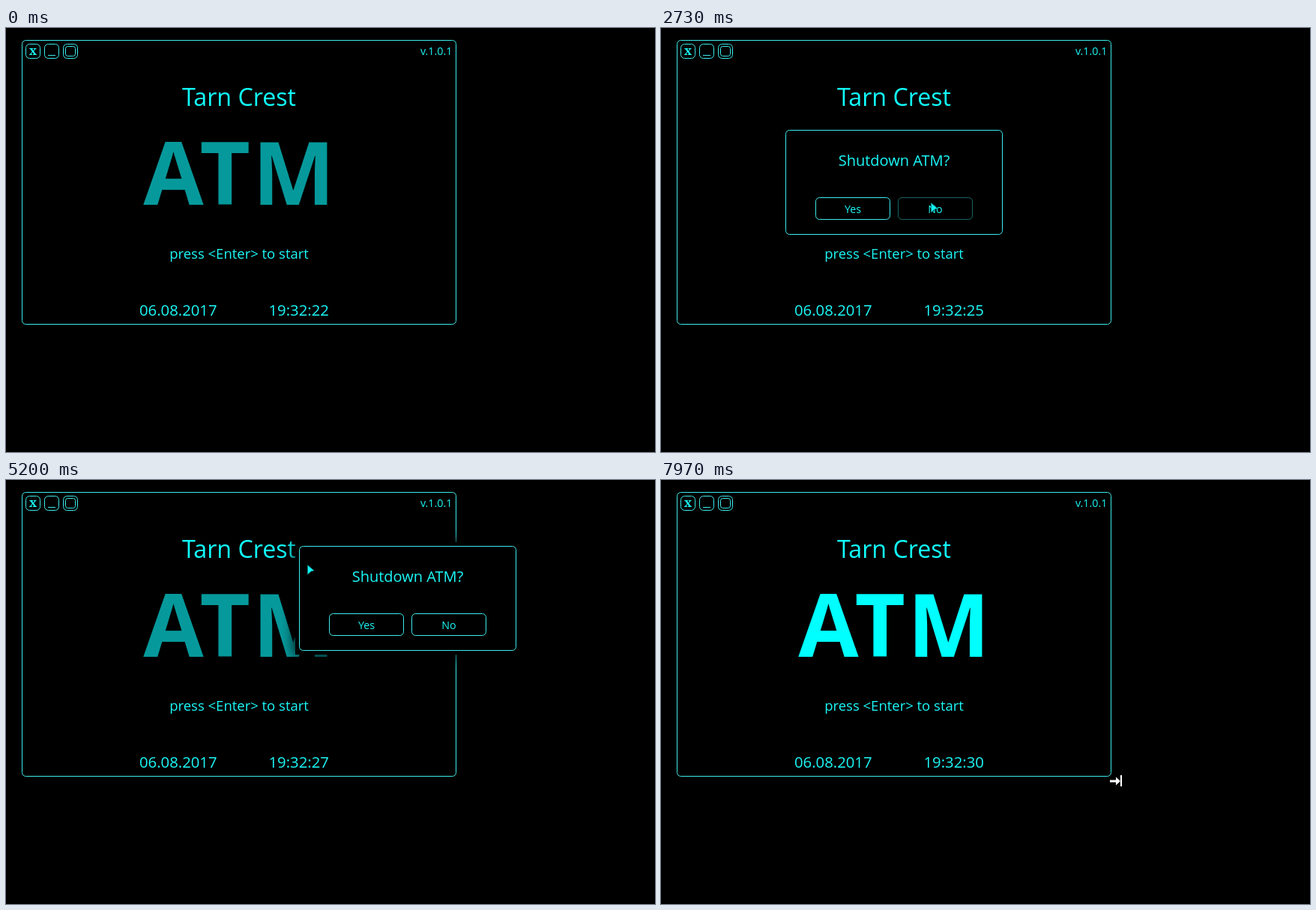
Write an HTML page that moves like this. It is 866 by 566 pixels and loops after 8000 ms.

```html
<!DOCTYPE html>
<html lang="en">
<head>
<meta charset="utf-8">
<title>ATM</title>
<style>
  html, body { margin: 0; width: 100%; height: 100%; overflow: hidden; background: #000; }
  svg { display: block; width: 866px; height: 566px; }
  text { fill: #1cf8f8; font-family: "Open Sans", "Noto Sans", sans-serif; font-weight: 500; }
  .line { fill: none; stroke: #3cecec; stroke-width: 1; }
  .mid { text-anchor: middle; }
  .heading { font-size: 32.2px; fill: #12ffff; }
  .logo { font-size: 116.5px; font-weight: 700; letter-spacing: 3px; }
  .prompt { font-size: 18.5px; }
  .clock { font-size: 20.3px; }
  .small { font-size: 14.3px; }
  .close { font: 700 16px "Noto Serif", serif; }
  .white { fill: #fff; }
</style>
</head>
<body>
<svg viewBox="0 0 866 566">
  <defs>
    <filter id="soft" x="-30%" y="-50%" width="160%" height="200%">
      <feGaussianBlur stdDeviation="9"/>
    </filter>
  </defs>

  <rect class="line" x="21.5" y="16.5" width="579" height="379" rx="5"/>
  <g class="line">
    <rect x="26.5" y="21.5" width="19" height="19" rx="5"/>
    <rect x="51.5" y="21.5" width="19" height="19" rx="5"/>
    <rect x="76.5" y="21.5" width="19" height="19" rx="5"/>
    <path d="M56 36.5h10"/>
    <rect x="79.5" y="24.5" width="13" height="13" rx="3"/>
  </g>
  <text class="close mid" x="36" y="36">x</text>
  <text class="small" x="595.5" y="36" text-anchor="end">v.1.0.1</text>

  <text class="heading mid" x="311" y="104">Tarn Crest</text>
  <text class="logo mid" id="logo" x="312.5" y="236">ATM</text>
  <text class="prompt mid" x="311" y="308">press &lt;Enter&gt; to start</text>
  <text class="clock" x="178" y="384">06.08.2017</text>
  <text class="clock" id="clock" x="350.5" y="384"></text>

  <g id="dialog">
    <rect x="-6" y="-6" width="302" height="152" filter="url(#soft)"/>
    <rect x="-5" y="-5" width="300" height="150"/>
    <rect class="line" x=".5" y=".5" width="289" height="139" rx="5"/>
    <text class="mid" x="145" y="48" font-size="20">Shutdown ATM?</text>
    <rect class="line" id="yes" x="40.5" y="90.5" width="99" height="29" rx="5"/>
    <rect class="line" id="no" x="150.5" y="90.5" width="99" height="29" rx="5"/>
    <text class="small mid" x="90" y="111">Yes</text>
    <text class="small mid" x="200" y="111">No</text>
  </g>

  <g id="cursor">
    <path id="arrow" d="M.5 .5L9 8L5 9L.5 13Z" fill="#14f5f5" stroke="#0a7a7a" stroke-width=".8"/>
    <g id="hand" class="white">
      <path d="M-7 0q2-2 3 0v-4q1-2 3-1q1-2 3 0q2-1 3 1q2 0 2 2v5l-2 4h-8z"/>
      <path d="M-2 -1v2M1 -1v2M4 -1v2" stroke="#000" stroke-width=".8"/>
    </g>
    <path id="resize" class="white" d="M-8 -1.5h8v-4l6 5.5l-6 5.5v-4h-8zM6 -8h2v15h-2z"/>
  </g>
</svg>
<script>
const LOOP = 8000;
const OPEN = [1900, 6820];
const DRAG = [2900, 3900];

// Places the pointer visits
const corner = [34, 20];
const grip = [379, 212];
const release = [604, 164];
const noButton = [554, 192];
const edge = [607, 402];

const stops = [
  [60, [760, 385]], [480, corner], [830, [515, 210]], [1630, [508, 254]],
  [2730, [360, 233]], [DRAG[0], grip], [DRAG[1], release], [4230, [129, 232]],
  [4600, corner], [5000, release], [5500, corner], [5850, corner],
  [6200, noButton], [OPEN[1], release], [7100, [674, 64]], [7700, edge]
];

const el = id => document.getElementById(id);
const clamp = v => Math.min(1, Math.max(0, v));
const mix = (a, b, k) => a + (b - a) * k;
const within = (t, [from, to]) => t >= from && t < to;
const show = (id, on) => el(id).setAttribute("visibility", on ? "inherit" : "hidden");
const move = (id, [x, y]) => el(id).setAttribute("transform", `translate(${Math.round(x)} ${Math.round(y)})`);

function pointerAt(t) {
  const i = stops.findIndex(([time]) => time > t);
  if (i < 1) return i ? edge : stops[0][1];
  const [t0, a] = stops[i - 1], [t1, b] = stops[i];
  const p = (t - t0) / (t1 - t0), k = p * p * (3 - 2 * p);
  return a.map((v, axis) => mix(v, b[axis], k));
}

// The drag slows down towards its end, sooner sideways than upwards
function dragOffset(t) {
  const left = 1 - clamp((t - DRAG[0]) / (DRAG[1] - DRAG[0]));
  return [
    (release[0] - grip[0]) * (1 - left ** 2.9),
    (release[1] - grip[1]) * (1 - left ** 1.8)
  ];
}

// A hovered button dims quickly and recovers slowly
const dimming = (t, on, off) => clamp((t - on) / 120) * (1 - clamp((t - off) / 250));
const setDim = (id, depth) => { el(id).style.opacity = 1 - 0.58 * depth; };

function draw(t) {
  el("logo").style.fill = within(t % 1000, [545, 990]) ? "#00ffff" : "#06999b";
  el("clock").textContent = `19:32:${22 + Math.floor((t + 340) / 1000)}`;

  const [dx, dy] = dragOffset(t);
  show("dialog", within(t, OPEN));
  move("dialog", [166 + dx, 136 + dy]);
  setDim("yes", dimming(t, 6040, 6190));
  setDim("no", dimming(t, 2580, DRAG[0]) + dimming(t, 6200, OPEN[1]));

  const dragging = within(t, DRAG), resizing = t >= 7700;
  show("cursor", t >= 60);
  show("hand", dragging);
  show("resize", resizing);
  show("arrow", !dragging && !resizing);
  move("cursor", dragging ? [grip[0] + dx, grip[1] + dy] : pointerAt(t));
}

const start = performance.now();
function tick() {
  draw((performance.now() - start) % LOOP);
  requestAnimationFrame(tick);
}
tick();
</script>
</body>
</html>
```
